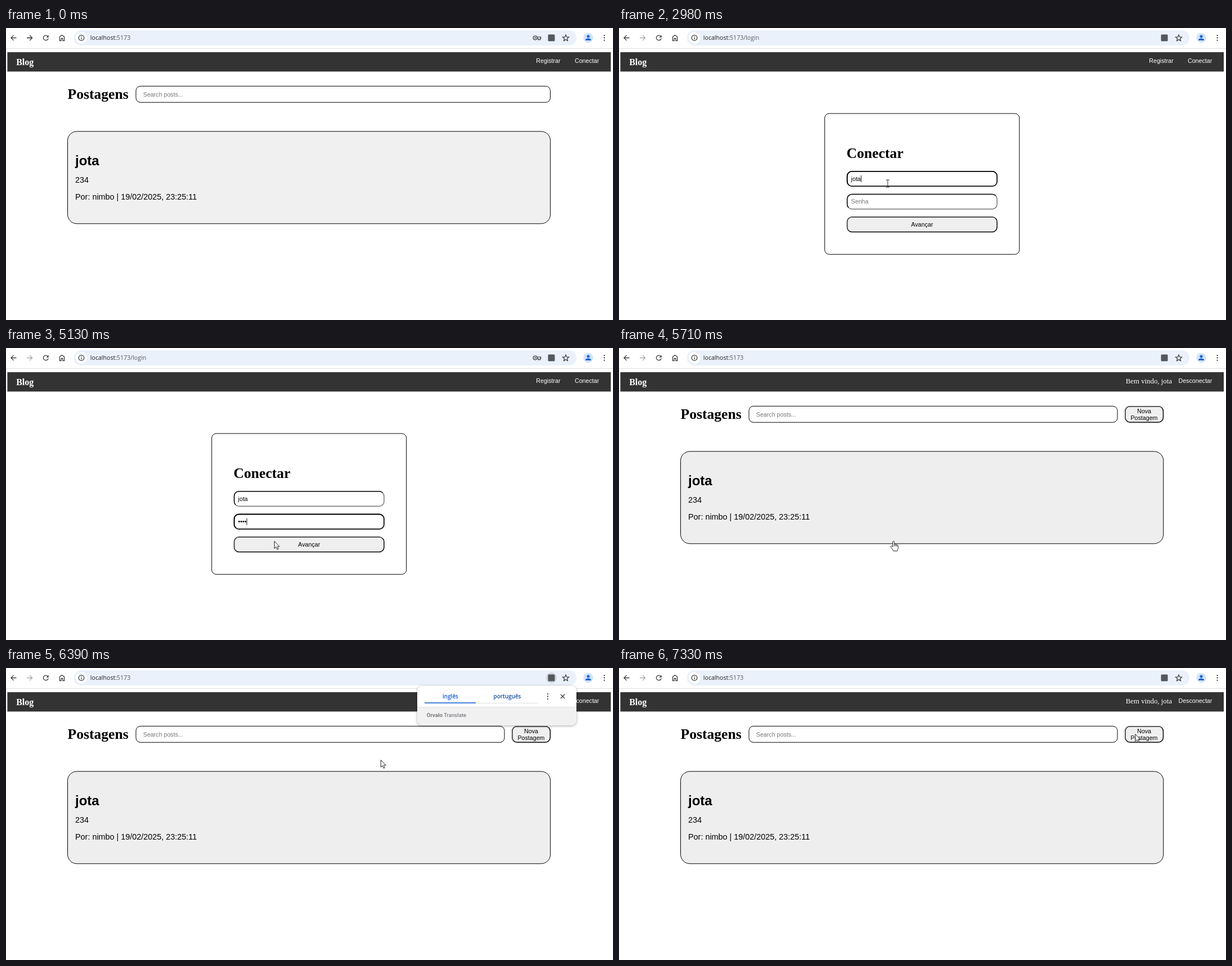
These frames come from a looping animation (1079x519 px, 8000 ms). An HTML page:

```html
<!DOCTYPE html>
<html lang="pt-BR">
<head>
<meta charset="utf-8">
<title>Blog</title>
<style>
html, body { margin: 0; width: 100%; height: 100%; overflow: hidden; background: #fff; }
svg { display: block; width: 1079px; height: 519px; }
text { font: 10.67px "Liberation Sans", Arial, sans-serif; white-space: pre; }
.h1 { font: bold 25.6px "Liberation Serif", "Times New Roman", serif; }
.brand { font: bold 16px "Liberation Serif", "Times New Roman", serif; }
.hello { font: 12.8px "Liberation Serif", "Times New Roman", serif; }
.post { font-size: 14.4px; }
.title { font-size: 24px; font-weight: bold; }
.url { font: 10.6px "Open Sans", sans-serif; fill: #55595e; }
.tab { font: 600 9.9px "Open Sans", sans-serif; text-anchor: middle; }
.foot { font: 9.7px Roboto, sans-serif; fill: #5f6368; }
.hint { fill: #757575; }
.mid { text-anchor: middle; }
.light { fill: #fff; }
.line { fill: none; stroke: #3c4043; stroke-width: 1.3; }
.box { fill: #fff; stroke: #000; }
.edge { fill: none; stroke-width: 1.5; }

/* hard switches: hidden unless a keyframe shows them */
.sw { opacity: 0; animation: 8s step-end infinite; }
#home { animation-name: home; }
#login, #path { animation-name: login; }
#guest { animation-name: guest; }
#member, #newPost { animation-name: member; }
#fwdOn { animation-name: fwd; }
#key { animation-name: key; }
#halo { animation-name: halo; }
#hint1 { animation-name: hint1; }
#hint2 { animation-name: hint2; }
#focus1 { animation-name: focus1; }
#focus2 { animation-name: focus2; }
#caret1 { animation-name: caret1; }
#caret2 { animation-name: caret2; }
#arrow { animation-name: arrow; }
#beam { animation-name: beam; }
#hand { animation-name: hand; }
@keyframes home { 0% { opacity: 1 } 11% { opacity: 0 } 71.37% { opacity: 1 } }
@keyframes login { 11% { opacity: 1 } 71.37% { opacity: 0 } }
@keyframes guest { 0% { opacity: 1 } 71.37% { opacity: 0 } }
@keyframes member { 71.37% { opacity: 1 } }
@keyframes fwd { 0% { opacity: 1 } 11% { opacity: 0 } }
@keyframes key { 0% { opacity: 1 } 24.6% { opacity: 0 } 46.2% { opacity: 1 } 71.37% { opacity: 0 } }
@keyframes halo { 74% { opacity: 1 } 87.5% { opacity: 0 } }
@keyframes hint1 { 0% { opacity: 1 } 24.6% { opacity: 0 } }
@keyframes hint2 { 0% { opacity: 1 } 51.6% { opacity: 0 } }
@keyframes focus1 { 19.5% { opacity: 1 } 46.2% { opacity: 0 } }
@keyframes focus2 { 46.2% { opacity: 1 } 66.3% { opacity: 0 } }
@keyframes caret1 { 19.5% { opacity: 1 } 40.1% { opacity: 0 } }
@keyframes caret2 { 46.2% { opacity: 1 } 66.1% { opacity: 0 } }
@keyframes arrow { .87% { opacity: 1 } 20% { opacity: 0 } 60% { opacity: 1 } 71.37% { opacity: 0 } 79.3% { opacity: 1 } }
@keyframes beam { 20% { opacity: 1 } 24.6% { opacity: 0 } 35% { opacity: 1 } 51.6% { opacity: 0 } }
@keyframes hand { 71.37% { opacity: 1 } 79.3% { opacity: 0 } }

#search { width: 736.5px; animation: search 8s step-end infinite; }
#card { fill: #f0f0f0; animation: card 8s step-end infinite; }
@keyframes search { 71.37% { width: 655px } }
@keyframes card { 71.37% { fill: #eee } }

/* typing: a white cover with the caret on its edge uncovers the text */
#type1 { transform: translate(411.9px, 268px); animation: type1 8s step-end infinite; }
#type2 { transform: translate(411.9px, 308.6px); animation: type2 8s step-end infinite; }
@keyframes type1 {
  24.6% { transform: translate(415.3px, 268px) } 28% { transform: translate(421.2px, 268px) }
  31.4% { transform: translate(424.2px, 268px) } 33.9% { transform: translate(430.2px, 268px) }
}
@keyframes type2 {
  51.6% { transform: translate(416.5px, 308.6px) } 54.1% { transform: translate(420.2px, 308.6px) }
  56.6% { transform: translate(424px, 308.6px) } 59.9% { transform: translate(427.7px, 308.6px) }
}

#popup { opacity: 0; transform-origin: 872.5px 85px; animation: popup 8s linear infinite; }
#panel { filter: drop-shadow(0 1px 2px rgba(0, 0, 0, .35)); }
@keyframes popup {
  0%, 74% { opacity: 0; transform: scale(.955) }
  77.4%, 86% { opacity: 1; transform: none }
  88%, 100% { opacity: 0; transform: none }
}

/* short holds match the pointer's sampled steps where it moves fast */
#pointer { animation: move 8s linear infinite; }
@keyframes move {
  0%, .87% { transform: translate(1060px, 447px); animation-timing-function: ease-in-out }
  10.1%, 11% { transform: translate(1014px, 61px) }
  14.4%, 15.3% { transform: translate(311px, 166.5px); animation-timing-function: ease-out }
  20.4% { transform: translate(436px, 260px) }
  22.1%, 34.7% { transform: translate(447px, 265px) }
  37.2%, 39.8% { transform: translate(477.6px, 276.5px) }
  40.8%, 43.2% { transform: translate(477.6px, 277.5px) }
  46%, 51.6% { transform: translate(477px, 309px) }
  60% { transform: translate(474px, 351px) }
  62.4%, 68% { transform: translate(476.6px, 343px) }
  71.37% { transform: translate(488px, 343px) }
  74.6%, 75.5% { transform: translate(507.6px, 340px); animation-timing-function: ease-in }
  79.8%, 80.7% { transform: translate(665.8px, 163px) }
  80.75% { transform: translate(735px, 148px); animation-timing-function: ease-out }
  91.5%, 100% { transform: translate(917.3px, 117px) }
}
</style>
</head>
<body>
<svg viewBox="0 0 1079 519">
  <defs>
    <g id="field">
      <rect class="edge" x=".8" y=".8" width="266.4" height="26.4" rx="8.5" style="fill: var(--bg, #fff); stroke: var(--low, #767676)"/>
      <path class="edge" d="M3.3 24.7A8.5 8.5 0 0 1 .8 18.7V9.3A8.5 8.5 0 0 1 9.3 .8H258.7A8.5 8.5 0 0 1 264.7 3.3" stroke="var(--top, #111)"/>
    </g>
    <rect id="ring" class="edge" x=".8" y=".8" width="266.4" height="26.4" rx="8.5" stroke="#000"/>
    <path id="back" class="line" d="M5 0H-4.4M0-4.6L-4.6 0 0 4.6"/>
    <g id="dots"><circle cy="-4.3" r="1.15"/><circle r="1.15"/><circle cy="4.3" r="1.15"/></g>
  </defs>

  <!-- browser bar -->
  <path d="M0 36.5H1079" stroke="#dcdfe3"/>
  <rect x="120.5" y="4" width="893.5" height="27" rx="13.5" fill="#ebf1fb"/>
  <use href="#back" x="13.5" y="17.5"/>
  <g transform="translate(42 17.5) scale(-1 1)">
    <use href="#back" opacity=".45"/>
    <use id="fwdOn" class="sw" href="#back"/>
  </g>
  <g transform="translate(70.8 17.5)">
    <path class="line" d="M3.2-3.1A4.4 4.4 0 1 0 4.3 1"/>
    <path d="M4.9-5V-.7H.6Z" fill="#3c4043"/>
  </g>
  <path class="line" transform="translate(99.5 17.5)" d="M-4.2 5V-1.6L0-5 4.2-1.6V5H1.4V1H-1.4V5Z"/>
  <circle cx="134" cy="17.5" r="10" fill="#fff"/>
  <circle class="line" cx="134" cy="17.5" r="4.8"/>
  <path class="line" d="M134 16.9V20.3M134 14.6V15.9"/>
  <text class="url" x="149.8" y="21.4"><tspan fill="#1f1f1f">localhost:</tspan>5173</text>
  <text id="path" class="url sw" x="221.3" y="21.4">/login</text>

  <g id="key" class="sw line">
    <circle cx="940.6" cy="17.5" r="3.4"/>
    <circle cx="940.6" cy="17.5" r=".7"/>
    <path d="M944 16.2H950.6V18.8H949.4V20.8H946.4V18.8H944"/>
  </g>
  <circle id="halo" class="sw" cx="969.5" cy="17.5" r="9.5" fill="#cfd6e0"/>
  <rect x="963.5" y="11.5" width="12" height="12" rx="1.5" fill="#54585d"/>
  <path class="line" transform="translate(995 17.8)" d="M0-5.6L1.6-1.9 5.5-1.6 2.5 1 3.4 4.9 0 2.8-3.4 4.9-2.5 1-5.5-1.6-1.6-1.9Z"/>
  <circle cx="1035" cy="17.5" r="8.8" fill="#d3e3fd"/>
  <g fill="#1a65c8"><circle cx="1035" cy="15" r="2.5"/><path d="M1030 22V20.9C1030 17.6 1040 17.6 1040 20.9V22Z"/></g>
  <use href="#dots" x="1063.6" y="17.5" fill="#3c4043"/>

  <!-- site header -->
  <rect x="2.4" y="43" width="1072.6" height="34.4" fill="#333"/>
  <text class="brand light" x="18.2" y="66">Blog</text>
  <g id="guest" class="sw light">
    <text x="942.3" y="62.3">Registrar</text>
    <text x="1011" y="62.3">Conectar</text>
  </g>
  <g id="member" class="sw light">
    <text class="hello" x="900.8" y="62.6">Bem vindo, jota</text>
    <text x="994.5" y="62.3">Desconectar</text>
  </g>

  <!-- post list -->
  <g id="home" class="sw">
    <text class="h1" x="109.6" y="126.4">Postagens</text>
    <rect id="search" class="box" x="231" y="103.4" height="28.8" rx="8"/>
    <text class="hint" x="243.8" y="121.5">Search posts...</text>
    <g id="newPost" class="sw">
      <rect class="edge" x="899.8" y="103.7" width="67.6" height="28.2" rx="8.5" style="fill: #efefef; stroke: #000"/>
      <path class="edge" d="M902.3 129.4A8.5 8.5 0 0 1 899.8 123.4V112.2A8.5 8.5 0 0 1 908.3 103.7H958.9A8.5 8.5 0 0 1 964.9 106.2" stroke="#555"/>
      <text class="mid" x="933.5" y="116.1">Nova</text>
      <text class="mid" x="933.5" y="128.2">Postagem</text>
    </g>
    <rect id="card" x="109.5" y="183.8" width="858.2" height="164" rx="16.5" stroke="#000"/>
    <text class="title" x="123" y="244">jota</text>
    <text class="post" x="123" y="275.4">234</text>
    <text class="post" x="123" y="305">Por: nimbo | 19/02/2025, 23:25:11</text>
  </g>

  <!-- login form -->
  <g id="login" class="sw">
    <rect class="box" x="365.7" y="152" width="346" height="250.3" rx="8"/>
    <text class="h1" x="404.6" y="231">Conectar</text>
    <use href="#field" x="404.8" y="254"/>
    <use href="#field" x="404.8" y="294.6"/>
    <use href="#field" x="404.8" y="335.2" style="--bg: #efefef; --top: #555; --low: #000"/>
    <use id="focus1" class="sw" href="#ring" x="404.8" y="254"/>
    <use id="focus2" class="sw" href="#ring" x="404.8" y="294.6"/>
    <text x="412.6" y="271.7">jota</text>
    <text x="412.6" y="312.4">••••</text>
    <g id="type1">
      <rect y="-8" width="24" height="16" fill="#fff"/>
      <path id="caret1" class="sw" d="M.3-6V6" stroke="#000"/>
    </g>
    <g id="type2">
      <rect y="-8" width="24" height="16" fill="#fff"/>
      <path id="caret2" class="sw" d="M.3-6V6" stroke="#000"/>
    </g>
    <text id="hint1" class="sw hint" x="412.6" y="271.7">Nome do usuário</text>
    <text id="hint2" class="sw hint" x="412.6" y="312.4">Senha</text>
    <text class="mid" x="538.8" y="353">Avançar</text>
  </g>

  <!-- language bubble -->
  <g id="popup">
    <g id="panel">
      <rect x="731" y="31.5" width="283" height="70.5" rx="9" fill="#fff"/>
      <path d="M731 69.5H1014V93A9 9 0 0 1 1005 102H740A9 9 0 0 1 731 93Z" fill="#f1f1f1"/>
    </g>
    <path d="M731 69.5H1014" stroke="#e2e2e2"/>
    <path d="M835 62.5H946" stroke="#dfe1e5"/>
    <path d="M744 62H835" stroke="#0b57d0" stroke-width="1.7"/>
    <text class="tab" x="790" y="54" fill="#0b57d0">inglês</text>
    <text class="tab" x="891" y="54" fill="#174ea6">português</text>
    <use href="#dots" x="963" y="50.5" fill="#3c4043"/>
    <path class="line" d="M985.8 46.8L993.2 54.2M993.2 46.8L985.8 54.2"/>
    <text class="foot" x="747.8" y="87"><tspan font-weight="500">Orvalo</tspan> Translate</text>
  </g>

  <!-- pointer -->
  <g id="pointer" fill="#fff" stroke="#222" stroke-linejoin="round">
    <path id="arrow" class="sw" d="M.5 .5V13.3L3.4 10.6 5.5 15.2 7.5 14.3 5.5 9.8H9.4Z"/>
    <path id="beam" class="sw" fill="none" d="M-3-6.5H-1L0-6 1-6.5H3M0-6V6M-3 6.5H-1L0 6 1 6.5H3"/>
    <path id="hand" class="sw" d="M-1.5 10.5V1.7A1.4 1.4 0 0 1 1.3 1.7V6.5C1.5 5.2 3.7 5.3 3.8 6.8 4.2 5.9 6 6.2 6.1 7.5 6.6 6.8 8.2 7.2 8.2 8.6V12C8.2 15 6.8 15.5 6.8 17.8H-.6C-.8 15.8-3 14.2-4.9 10.6-5.6 9.1-3.8 8-2.7 9.2ZM1.3 6.5V9.5M3.8 6.8V9.7M6.1 7.5V10"/>
  </g>
</svg>
</body>
</html>
```
